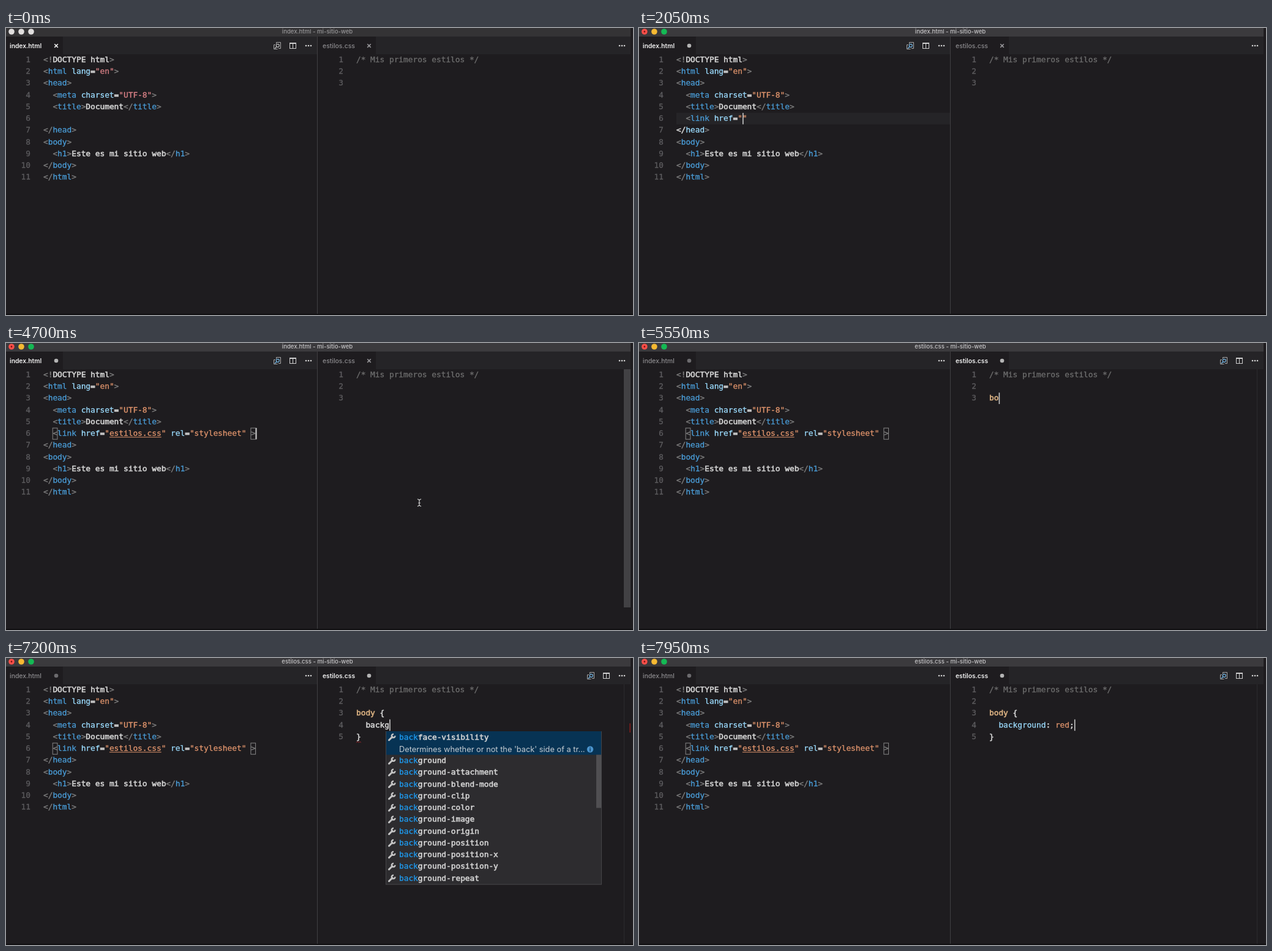
Recreate the animation shown at these times as an HTML page with a canvas. Size 1024x470 px, loop 8000 ms.

```html
<!DOCTYPE html>
<html lang="es">
<head>
<meta charset="utf-8">
<title>Editor</title>
<style>
html, body { margin: 0; height: 100%; overflow: hidden; background: #1e1c1f; }
canvas { display: block; }
</style>
</head>
<body>
<canvas id="stage" width="1024" height="470"></canvas>
<script>
const ctx = document.getElementById('stage').getContext('2d');
const LOOP = 8000, ROW = 19.25, CHAR = 7.706, LEFT = 61, RIGHT = 572;
const MONO = '12.8px "DejaVu Sans Mono", monospace';
const BG = '#1e1c1f', WHITE = '#d6d6d6', GRAY = '#808080', TAG = '#4a9dd8', ATTR = '#9cdcfe',
  GOLD = '#dfb584', COMMENT = '#6e6e6e', NUMBER = '#5c5b5e';
let stringColor;

const HTML = ['<!DOCTYPE html>', '<html lang="en">', '<head>', '  <meta charset="UTF-8">',
  '  <title>Document</title>', '', '</head>', '<body>', '  <h1>Este es mi sitio web</h1>', '</body>', '</html>'];

// Each run of typing: start, end, text
const LINK = [[1300, 1650, '<link'], [1700, 2000, ' href="'], [2150, 2950, 'estilos.css'], [3000, 3050, '"'],
  [3150, 3500, ' rel="'], [3550, 4000, 'stylesheet'], [4050, 4300, '" >']];
const BODY = [[5400, 5850, 'body '], [5900, 5950, '{']];
const RULE = [[6700, 7200, 'backg'], [7400, 7410, 'round: '], [7500, 7750, 'red'], [7800, 7850, ';']];
const FOCUS = 5200, ENTER = 6350;

const TAGS = 'label legend li link blockquote col colgroup dl html small table title'.split(' ');
const ATTRS = 'rel role crossorigin hreflang dir draggable'.split(' ');
const PROPS = ['background', ...'attachment blend-mode clip color image origin position position-x position-y repeat size'
  .split(' ').map(s => 'background-' + s)];

const within = (t, a, b) => t >= a && t < b;
const rowTop = i => 42.4 + ROW * i;
const baseline = i => rowTop(i) + 13.4;
const ease = p => p * p * (3 - 2 * p);

function typed(runs, t) {
  return runs.map(([a, b, s]) =>
    t < a ? '' : s.slice(0, Math.min(s.length, 1 + Math.floor((t - a) / (b - a) * s.length)))).join('');
}

function box(x, y, w, h, color) {
  ctx.fillStyle = color;
  ctx.fillRect(x, y, w, h);
}

function frame(x, y, w, h, color) {
  ctx.strokeStyle = color;
  ctx.lineWidth = 1;
  ctx.strokeRect(x, y, w, h);
}

function disc(x, y, r, color) {
  ctx.fillStyle = color;
  ctx.beginPath();
  ctx.arc(x, y, r, 0, 7);
  ctx.fill();
}

function path(points, color, width = 1) {
  ctx.strokeStyle = color;
  ctx.lineWidth = width;
  ctx.beginPath();
  points.forEach(p => ctx.lineTo(...p));
  ctx.stroke();
}

function label(text, x, y, color, size, weight = 500, align = 'left') {
  ctx.font = `${weight} ${size}px Inter, sans-serif`;
  ctx.textAlign = align;
  ctx.fillStyle = color;
  ctx.fillText(text, x, y);
}

// A thin outline thickens bright text the way the editor renders it
function mono(text, x, y, color, align = 'left') {
  ctx.font = MONO;
  ctx.textAlign = align;
  ctx.fillStyle = ctx.strokeStyle = color;
  ctx.lineWidth = color === WHITE || color === GOLD ? 0.55 : 0.3;
  ctx.fillText(text, x, y);
  ctx.strokeText(text, x, y);
}

function codeLine(tokens, x, row) {
  for (const [text, color] of tokens) {
    mono(text, x, baseline(row), color);
    x += text.length * CHAR;
  }
}

function htmlTokens(line) {
  let inTag = false, wantName = false;
  return (line.match(/<!|<\/?|"[^"]*"?|[>=]|[^<>"=\s]+|\s+/g) || []).map(s => {
    let color = WHITE;
    if (s[0] === '<') {
      inTag = wantName = s !== '<!';
      color = GRAY;
    } else if (s === '>') {
      inTag = false;
      color = GRAY;
    } else if (inTag && s[0] === '"') color = stringColor;
    else if (inTag && s !== '=' && s.trim()) {
      color = wantName ? TAG : ATTR;
      wantName = false;
    }
    return [s, color];
  });
}

function bracket(x, col, row) {
  frame(x + col * CHAR - 0.2, rowTop(row) + 0.6, CHAR, ROW - 0.8, '#858585');
}

function caret(x, col, row) {
  box(x + col * CHAR + 0.2, rowTop(row) + 0.4, 1.6, ROW - 0.6, '#c8c8c8');
}

function wrench(x, y) {
  ctx.lineCap = 'round';
  path([[x - 4.5, y + 4.5], [x + 1, y - 1]], '#c5c5c5', 3);
  ctx.lineCap = 'butt';
  ctx.lineWidth = 2.4;
  ctx.beginPath();
  ctx.arc(x + 2.6, y - 2.4, 2.8, -0.1, 4.85);
  ctx.stroke();
}

function popup(x, y, rows, match, detail) {
  const extra = detail ? 1 : 0, h = (rows.length + extra) * ROW + 1;
  box(x, y, 353, h, '#2d2c2f');
  frame(x + 0.5, y + 0.5, 352, h - 1, '#454447');
  box(x + 1, y, 351, ROW * (1 + extra), '#073354');
  box(x + 344, y + ROW * (1 + extra), 8, 87, '#504f52');
  rows.forEach((text, i) => {
    const base = y + 13.5 + ROW * (i + (i ? extra : 0));
    const at = text.startsWith(match) ? match.length : 0;
    wrench(x + 10, base - 3.5);
    mono(text.slice(0, at), x + 22, base, '#1e9cf2');
    mono(text.slice(at), x + 22 + at * CHAR, base, WHITE);
  });
  if (detail) {
    label(detail, x + 22, y + 33.8, '#c4ccd2', 12.8, 400);
    disc(x + 334, y + 29.5, 5.2, '#4a93cc');
    label('i', x + 334, y + 33, '#073354', 9, 700, 'center');
  }
}

function dots(x) {
  for (const d of [-4, 0, 4]) disc(x + d, 29, 1.3, '#d0d0d0');
}

function toolIcons(x, tint) {
  path([[x - 1.5, 26], [x - 1.5, 23.5], [x + 5.5, 23.5], [x + 5.5, 33.5], [x + 2, 33.5]], '#a8a8a8');
  path([[x - 3, 27.5], [x - 5.5, 27.5], [x - 5.5, 34.5], [x + 0.5, 34.5]], '#a8a8a8');
  ctx.strokeStyle = tint;
  ctx.lineWidth = 1.2;
  ctx.beginPath();
  ctx.arc(x + 0.8, 28.8, 2.5, 0, 7);
  ctx.stroke();
  path([[x - 1, 30.6], [x - 4, 33.6]], tint, 1.4);
  frame(x + 20.5, 24.5, 10, 9, '#cfcfcf');
  box(x + 20, 24, 11, 2, '#cfcfcf');
  box(x + 25, 24, 1, 10, '#cfcfcf');
}

function tab(x, width, name, active, dirty, markX) {
  box(x, 14, width, 29, BG);
  const [tone, size, weight] = active ? ['#f2f2f2', 10.25, 600] : ['#8c8b8e', 10.45, 500];
  label(name, x + (x ? 8 : 6), 32.5, tone, size, weight);
  if (dirty) return disc(markX, 29, 3.3, active ? '#b4b4b4' : '#6c6b6e');
  const color = active ? '#f0f0f0' : '#98979a';
  path([[markX - 2.8, 26.3], [markX + 2.8, 31.9]], color, 1.6);
  path([[markX + 2.8, 26.3], [markX - 2.8, 31.9]], color, 1.6);
}

function chrome(t, right) {
  const plain = t < 50;
  box(0, 0, 1024, 470, BG);
  box(0, 0, 1020, 14, plain ? '#343335' : '#3b3a3d');
  box(0, 14, 1020, 29, '#252427');
  const lights = plain ? ['#e0dede', '#e0dede', '#e0dede'] : ['#fb4f49', '#f6b932', '#14b954'];
  lights.forEach((c, i) => disc(9 + 16 * i, 6, 4.8, c));
  if (!plain) disc(9, 6, 1.4, '#7d1414');
  label((right ? 'estilos.css' : 'index.html') + ' - mi-sitio-web', 508.5, 9.2,
    plain ? '#969597' : '#c6c5c7', 9.6, 500, 'center');
  tab(0, 93, 'index.html', !right, t >= 1300, 82);
  tab(509, 95, 'estilos.css', right, t >= 5400, 593);
  dots(494);
  dots(1006);
  toolIcons(right ? 955 : 443, plain ? '#b8b8b8' : '#74b4e0');
  box(508, 14, 1, 454, '#403f42');
  box(0, 468, 1024, 2, '#111012');
}

function leftPane(t) {
  const before = typed(LINK, t);
  const openQuote = (before.split('"').length - 1) % 2 === 1;
  const closed = before.endsWith('>');
  if (within(t, 1200, 3000)) box(LEFT, rowTop(5), 447, ROW, '#252427');
  HTML.forEach((line, i) => {
    mono(i + 1, 40, baseline(i), NUMBER, 'right');
    let tokens = htmlTokens(i === 5 ? '  ' + before + (openQuote ? '"' : '') : line);
    if (i === 6 && before && !closed) tokens = [['</', WHITE], ['head', ATTR], ['>', GRAY]];
    codeLine(tokens, LEFT, i);
  });
  if (before.includes('estilos.css')) box(LEFT + 14 * CHAR, rowTop(5) + 15, 11 * CHAR, 1, stringColor);
  if (closed) {
    bracket(LEFT, 2, 5);
    bracket(LEFT, 44, 5);
  }
  if (within(t, 1200, FOCUS)) caret(LEFT, 2 + before.length, 5);
  if (within(t, 1400, 1700)) popup(88, 158, TAGS, 'l');
  if (within(t, 3220, 3380)) popup(267, 158, ATTRS, 'r');
}

function rightPane(t) {
  const head = typed(BODY, t), rule = typed(RULE, t), split = t >= ENTER;
  const open = head.endsWith('{');
  for (let i = 0; i < (split ? 5 : 3); i++) mono(i + 1, 551, baseline(i), NUMBER, 'right');
  codeLine([['/* Mis primeros estilos */', COMMENT]], RIGHT, 0);
  codeLine([[head.slice(0, 5), GOLD], [head.slice(5) + (open && !split ? '}' : ''), WHITE]], RIGHT, 2);
  if (split) {
    const [, name, colon, value, end] = rule.match(/^(\w*)(:? ?)(\w*)(;?)$/);
    codeLine([['  ' + name, colon ? ATTR : WHITE], [colon, WHITE], [value, stringColor], [end, WHITE]], RIGHT, 3);
    codeLine([['}', WHITE]], RIGHT, 4);
  } else if (open) {
    bracket(RIGHT, 5, 2);
    bracket(RIGHT, 6, 2);
  }
  if (t >= FOCUS) {
    box(1009, 43, 1, 425, '#2b2a2d');
    caret(RIGHT, split ? 2 + rule.length : head.length, split ? 3 : 2);
  }
  if (open && t < 7850) box(1018.5, split ? 107 : 80, 1.2, 15, '#a01c1c');
  if (within(t, 6700, 7850))
    path([[572, 138.5], [574, 137], [576, 138.5], [578, 137], [580, 138.5]], '#8f2428');
  if (within(t, 7050, 7260))
    popup(620, 120, ['backface-visibility', ...PROPS.slice(0, 11)], 'back',
      "Determines whether or not the 'back' side of a tr...");
  else if (within(t, 7260, 7400)) popup(620, 120, PROPS, 'backg');
}

function pointer(t) {
  const slider = Math.max(0, Math.min(1, (t - 4400) / 100, (5500 - t) / 300));
  ctx.globalAlpha = slider;
  box(1009, 43, 11, 390, '#424144');
  ctx.globalAlpha = 1;
  if (!within(t, 4350, 5400)) return;
  const go = ease(Math.min(1, (t - 4350) / 350));
  const back = ease(Math.max(0, Math.min(1, (t - 4800) / 300)));
  const x = 440 + 235 * go - 55 * back, y = 215 + 46.5 * go - 170 * back;
  path([[x - 3, y - 6], [x, y - 4.5], [x + 3, y - 6]], '#d0d0d0', 1.2);
  path([[x - 3, y + 6], [x, y + 4.5], [x + 3, y + 6]], '#d0d0d0', 1.2);
  path([[x, y - 5], [x, y + 5]], '#d0d0d0', 1.2);
  path([[x - 1.8, y + 0.5], [x + 1.8, y + 0.5]], '#d0d0d0');
}

function draw(now) {
  const t = now % LOOP;
  stringColor = t < 50 ? '#d98086' : '#e0946c';
  chrome(t, t >= FOCUS);
  leftPane(t);
  rightPane(t);
  pointer(t);
  requestAnimationFrame(() => draw(performance.now() - start));
}

const start = performance.now();
draw(0);
</script>
</body>
</html>
```
